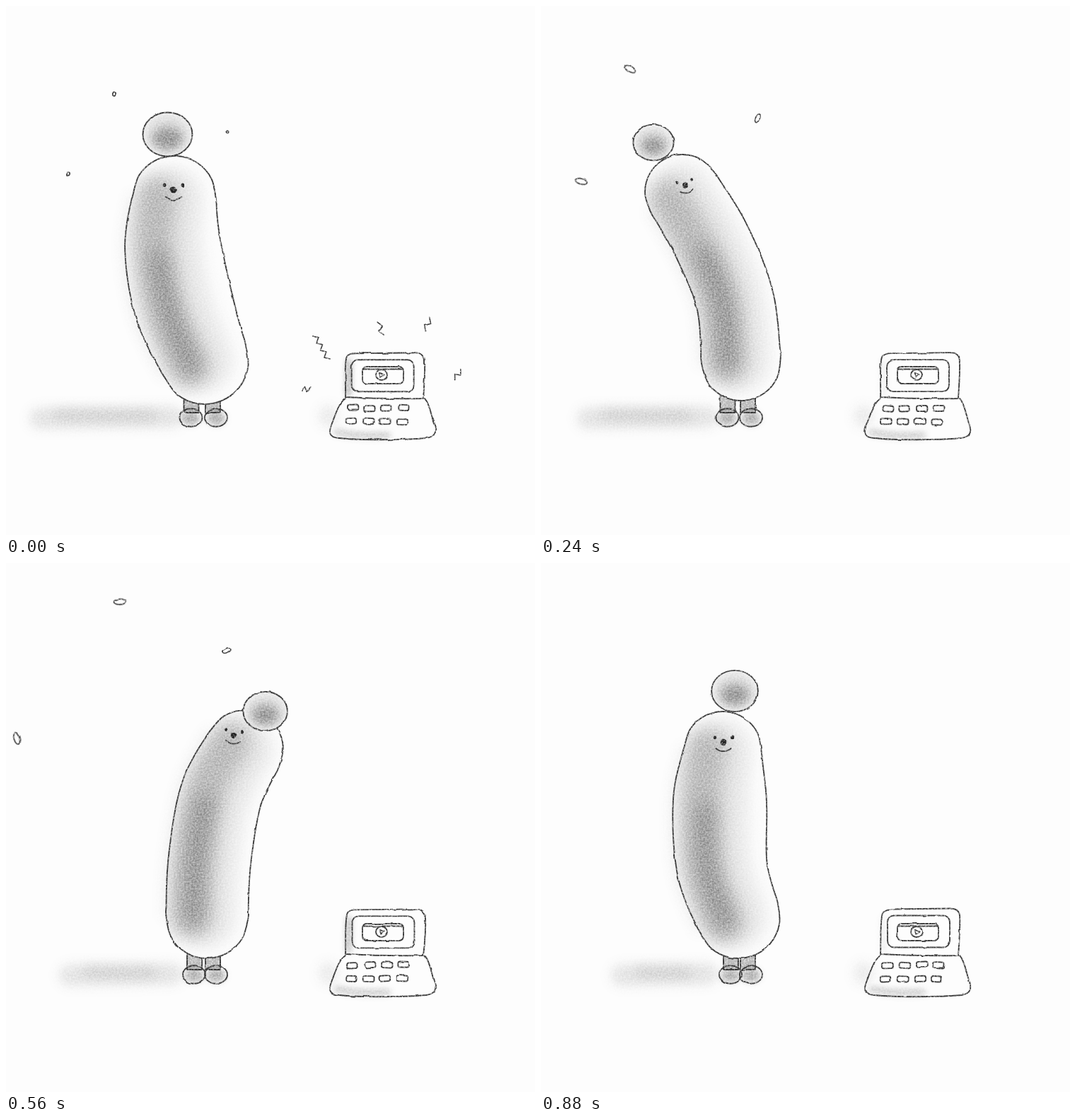
These frames come from a looping animation (748 px wide and 748 px high, 960 ms). An HTML page:

```html
<!DOCTYPE html>
<html lang="en">
<head>
<meta charset="utf-8">
<title>Dancing sausage</title>
<style>
html, body { margin: 0; width: 100%; height: 100%; overflow: hidden; background: #fdfdfd; }
svg { display: block; width: 100%; height: 100%; }
.ink { fill: none; stroke: #383838; stroke-width: 1.9; stroke-linecap: round; stroke-linejoin: round; filter: url(#pencil); }
.soft { fill: none; stroke: #222; stroke-linecap: round; stroke-linejoin: round; }
.paper { fill: #fdfdfd; }
.grey { fill: #222; stroke: none; }
</style>
</head>
<body>
<svg viewBox="0 0 748 748">
  <defs id="defs"></defs>
  <g filter="url(#chalk8)" id="ground"></g>
  <g class="ink" id="legs"></g>
  <path class="paper" id="skin"/>
  <g clip-path="url(#bodyClip)"><g filter="url(#chalk13)" id="bodyShade"></g></g>
  <g class="ink" id="bodyInk"></g>
  <ellipse class="paper" id="ball"/>
  <g clip-path="url(#ballClip)"><g filter="url(#chalk7)" id="ballShade"></g></g>
  <g filter="url(#chalk4)" id="smallShade"></g>
  <g class="ink" id="ink"></g>
</svg>
<script>
const STEP = 80, COUNT = 12;
const $ = id => document.getElementById(id);
const { PI, sin, cos, atan2, hypot, min, max, round } = Math;

// Key poses by step: four circles down the body (x y r), the ball (x y r), the nose and head tilt (x y deg).
const poses = {
  0: [238,271,59, 236,340,68, 252,425,70, 281,501,62, 228.5,181.5,33, 237,260,0],
  1: [168,272,57, 183,345,66, 223,435,66, 272,497,62, 177,189,32, 159,263,-9],
  3: [200,263,53, 240,330,55, 274,415,55, 283,502,56, 159,193,27, 204,253,-12],
  5: [271,258,53, 300,325,54, 297,420,51, 285,497,58, 226,187,28.5, 268,239,-20],
  8: [370,266,56, 306,330,60, 283,425,62, 284,503,58, 437,221,30, 349,245,20],
  10: [292,263,53, 281,325,66, 276,420,63, 288,500,60, 323,195,31, 277,246,-8],
  11: [257,265,55, 253,335,66, 256,430,64, 279,500,59, 274,181,31, 258,253,0]
};
const keys = Object.keys(poses).map(Number);

// One list per ring of the laptop: centre x y, length and direction of each zigzag.
const rings = [
  [[437,475,40,62], [529,444,19,82], [602,440,20,122], [650,517,16,-40], [413,540,11,10]],
  [[453,461,18,40], [548,444,18,-50], [620,466,19,122], [638,546,20,-14], [419,527,15,23]],
  [[427,500,22,58], [490,450,20,78], [594,455,18,-28], [640,519,23,-28]]
];

// Crumbs rise and tumble: each gives x, y, angle and size at a step.
const crumbs = [
  k => [144 - 18 * cos(2 * PI * (k - 3) / 9), 43 + 81 * max(0, 1 - k / 10) ** 1.6, 36 * k - 74, 1],
  k => [307 + 1.4 * k + 6 * cos(2 * PI * k / 5), 178 - 82 * (k / 10) ** 1.2, 40 - 35 * k, .75],
  k => [88 - 10.4 * k, 248 - 15 * cos(2 * PI * (k - 1) / 8), 105 - 30 * k, 1]
];

const mix = (a, b, u) => a + (b - a) * u;

function random(seed) {
  let s = seed * 7919 + 17;
  return () => (s = (s * 16807) % 2147483647) / 2147483647;
}

function poseAt(k) {
  const a = keys.filter(q => q <= k).pop(), b = keys.find(q => q >= k);
  const u = a === b ? 0 : (k - a) / (b - a);
  const v = poses[a].map((n, i) => mix(n, poses[b][i], u));
  return { spine: [0, 3, 6, 9].map(i => v.slice(i, i + 3)), ball: v.slice(12, 15), face: v.slice(15) };
}

// Point and radius on the spine, u from 0 (head) to 1 (tail)
function onSpine(spine, u) {
  const i = min(2, Math.floor(u * 3)), t = u * 3 - i;
  const [p, a, b, q] = [i - 1, i, i + 1, i + 2].map(j => spine[max(0, min(3, j))]);
  return a.map((n, j) => n + t / 2 * (b[j] - p[j] +
    t * (2 * p[j] - 5 * n + 4 * b[j] - q[j] + t * (3 * (n - b[j]) + q[j] - p[j]))));
}

// Point beside the spine: side -1 is the left edge, 1 the right
function beside(spine, u, side) {
  const [x, y, r] = onSpine(spine, u);
  const [a, b] = [onSpine(spine, max(0, u - .02)), onSpine(spine, min(1, u + .02))];
  const dir = atan2(b[1] - a[1], b[0] - a[0]) - PI / 2;
  return [x + side * r * cos(dir), y + side * r * sin(dir)];
}

const span = (n, fn) => Array.from({ length: n + 1 }, (_, i) => fn(i / n));
const edge = (spine, side, from = 0, to = 1) => span(10, t => beside(spine, mix(from, to, t), side));

function cap([x, y, r], [sx, sy]) {
  const start = atan2(sy - y, sx - x);
  return span(6, t => [x + r * cos(start + PI * t), y + r * sin(start + PI * t)]).slice(1, -1);
}

function outlineOf(spine) {
  const left = edge(spine, -1), right = edge(spine, 1);
  return [...left.slice().reverse(), ...cap(spine[0], left[0]), ...right, ...cap(spine[3], right[10])];
}

// Catmull-Rom curve through points
function smooth(pts, closed) {
  const n = pts.length;
  const at = i => closed ? pts[(i + n) % n] : pts[max(0, min(n - 1, i))];
  let d = 'M' + pts[0];
  for (let i = 0; i < (closed ? n : n - 1); i++) {
    const [p, a, b, q] = [at(i - 1), at(i), at(i + 1), at(i + 2)];
    const c = [0, 1].map(j => a[j] + (b[j] - p[j]) / 6), e = [0, 1].map(j => b[j] - (q[j] - a[j]) / 6);
    d += `C${c} ${e} ${b}`;
  }
  return d + (closed ? 'Z' : '');
}

const ellipse = (x, y, rx, ry, attrs = '') => `<ellipse cx="${x}" cy="${y}" rx="${rx}" ry="${ry}" ${attrs}/>`;
const path = (d, attrs = '') => `<path d="${d}" ${attrs}/>`;
const rect = (x, y, w, h, rx, attrs = '') => `<rect x="${x}" y="${y}" width="${w}" height="${h}" rx="${rx}" ${attrs}/>`;
const soft = (pts, width, alpha) => path(smooth(pts), `class="soft" stroke-width="${width}" opacity="${alpha}"`);
const grey = alpha => `class="grey" opacity="${alpha}"`;

const area = 'x="0" y="0" width="748" height="748" filterUnits="userSpaceOnUse" color-interpolation-filters="sRGB"';
const noise = (freq, name) => `<feTurbulence type="fractalNoise" baseFrequency="${freq}" numOctaves="2" result="${name}"/>`;
const grain = (gain, bias) => noise(.4, 'n') +
  `<feColorMatrix in="n" values="0 0 0 0 0 0 0 0 0 0 0 0 0 0 0 ${gain} 0 0 0 ${bias}" result="g"/>
   <feComposite in="s" in2="g" operator="in"/>`;
$('defs').innerHTML = [13, 8, 7, 4].map(r => `<filter id="chalk${r}" ${area}>
    <feGaussianBlur in="SourceGraphic" stdDeviation="${r}" result="s"/>${grain(.9, .3)}</filter>`).join('') +
  `<filter id="pencil" ${area}>${noise(.06, 'w')}
    <feDisplacementMap in="SourceGraphic" in2="w" scale="2.5" xChannelSelector="R" yChannelSelector="G" result="s"/>
    ${grain(2, -.1)}</filter>
  <clipPath id="bodyClip"><path id="bodyEdge"/></clipPath>
  <clipPath id="ballClip"><ellipse id="ballEdge"/></clipPath>`;
const noises = document.querySelectorAll('feTurbulence');

function face([x, y, tilt], size) {
  return `<g transform="translate(${x} ${y}) rotate(${tilt}) scale(${size})">` +
    [-12.5, 12.5].map(e => ellipse(e, -6.5, 2.2, 2.6, 'class="grey"')).join('') +
    ellipse(0, 0, 4.6, 4.3, 'class="grey"') + path('M-11 9.500Q0 18 11 9.500') + '</g>';
}

function laptop(k) {
  const rnd = random(k + 1), j = () => rnd() * 2 - 1;
  const l = 480.5 + j(), t = 489.500 + j(), r = 592 + j(), b = 613;
  let s = path(`M480 553C481 535 ${l - 2} ${t + 22} ${l + 2} ${t + 6}Q${l + 4} ${t + 1} ${l + 15} ${t + 1}L${r - 14} ${t}` +
    `Q${r - 1} ${t} ${r} ${t + 10}C${r + 1} ${t + 30} ${r - 1} 540 590 555Q535 556 480 553`);
  s += path(`M480 555C470 562 467 575 461 590C457 600 454 ${b - 3} 471 ${b - 2}C500 ${b + 1} 560 ${b + 1} 594 ${b - 2}` +
    `C609 ${b - 4} 609 600 605 590C601 578 599 562 592 555`);
  s += rect(l + 9, t + 10, 88, 45, 9) + rect(504, 510, 58, 24, 6) + path('M505 513.500H561') +
    ellipse(531, 521.5, 8, 7.5) + path('M528.500 518.500L535 521.500L530 525Z', 'stroke-width="1.4"');
  for (let i = 0; i < 8; i++) {
    const row = i >> 2, x = 490 - 2 * row + i % 4 * 24 + j(), y = 568.5 + 19 * row + j(), w = 15 + j();
    s += rect(x - w / 2, y - 4, w, 8, 2.8, `transform="rotate(${j() * 4} ${x} ${y})"`);
  }
  return s;
}

// Zigzags move outwards for three steps, then pause for one
function ringing(k) {
  const phase = k % 4;
  if (phase === 3) return '';
  return rings[k >> 2].map(([x, y, len, deg]) => {
    const dx = x - 535, dy = y - 560, push = 12 * (phase - 1) / hypot(dx, dy);
    const n = max(3, round(len / 6));
    const pts = span(n, t => [(t - .5) * len, (round(t * n) % 2 ? -1 : 1) * 3.2]).join(' ');
    return `<polyline points="${pts}" stroke-width="1.6" transform="translate(${x + dx * push} ${y + dy * push}) rotate(${deg})"/>`;
  }).join('');
}

function crumbMarks(k) {
  return crumbs.map(at => {
    const [x, y, deg, size] = at(k);
    const r = 8.5 * size * min(1, .27 + .73 * k) * max(0, min(1, (10.3 - k) / 3));
    return ellipse(x, y, r, r * (k ? .45 : .9), `stroke-width="1.7" transform="rotate(${deg} ${x} ${y})"`);
  }).join('');
}

function draw(k) {
  const { spine, ball: [bx, by, br], face: head } = poseAt(k);
  const outline = smooth(outlineOf(spine), true);
  const rx = br * 1.06, ry = br * .94;
  const feet = [261.5 + .65 * min(k, 10), 297];
  const shadeX = 30 + 6 * k;

  noises.forEach((n, i) => n.setAttribute('seed', k * 5 + i + 1));
  $('skin').setAttribute('d', outline);
  $('bodyEdge').setAttribute('d', outline);
  for (const id of ['ball', 'ballEdge'])
    Object.entries({ cx: bx, cy: by, rx, ry }).forEach(([name, v]) => $(id).setAttribute(name, v));

  $('ground').innerHTML = soft([[shadeX + 18, 583], [235, 581]], 30, .14) + soft([[shadeX + 45, 577], [205, 579]], 18, .12) +
    ellipse(456, 580, 14, 16, grey(.1)) + soft(edge(spine, -1), 8, .13);

  $('legs').innerHTML = feet.map((x, i) => rect(x - (i ? 15 : 10), 545, 21, 30, 0) +
    rect(x - (i ? 15 : 10), 545, 21, 30, 0, grey(.3))).join('');

  $('bodyShade').innerHTML = soft(edge(spine, -.05), 84, .13) + soft(edge(spine, -.45), 60, .3) +
    soft(edge(spine, -.3, .4, 1), 32, .34);

  $('ballShade').innerHTML = ellipse(bx, by, rx, ry, grey(.17)) + ellipse(bx, by + br * .18, rx * .6, ry * .5, grey(.5));

  $('smallShade').innerHTML = feet.map(x => ellipse(x, 583, 13, 10, grey(.42))).join('') +
    soft([[485, 503], [484, 548]], 6, .3 + .28 * cos(PI * k / 4)) + soft([[468, 603], [500, 607], [540, 607]], 8, .3);

  $('bodyInk').innerHTML = path(outline) + face(head, br / 32);
  $('ink').innerHTML = ellipse(bx, by, rx, ry) + feet.map(x => ellipse(x, 582, 16, 12.7)).join('') +
    crumbMarks(k) + laptop(k) + ringing(k);
}

const start = performance.now();
let shown = -1;
function tick() {
  const k = Math.floor((performance.now() - start) / STEP) % COUNT;
  if (k !== shown) draw(shown = k);
  requestAnimationFrame(tick);
}
tick();
</script>
</body>
</html>
```
